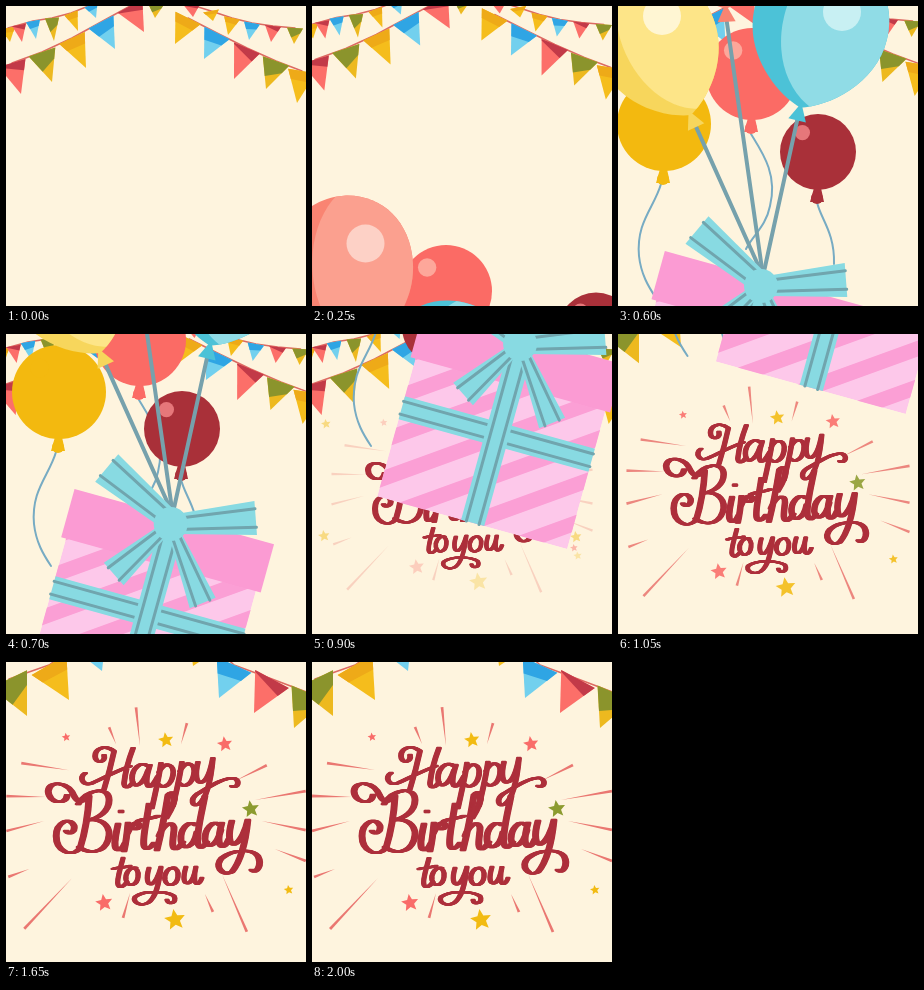
Write an HTML page with a canvas that moves like this. It is 300x300 px and loops after 2.3 s.

```html
<!DOCTYPE html>
<html lang="en">
<head>
<meta charset="utf-8">
<title>Happy Birthday to you</title>
<style>
html, body { margin: 0; width: 100%; height: 100%; overflow: hidden; background: #fef4de; }
canvas { display: block; width: 100vw; height: 100vh; }
</style>
</head>
<body>
<canvas id="stage" width="300" height="300" role="img" aria-label="Happy Birthday to you"></canvas>
<script>
const canvas = document.getElementById('stage');
const c = canvas.getContext('2d');
const LOOP = 2300, STEP = 50;
const ramp = (t, a, b) => Math.min(1, Math.max(0, (t - a) / (b - a)));
const smooth = p => p * p * (3 - 2 * p);

function poly(points, fill) {
  c.beginPath();
  points.forEach(([x, y]) => c.lineTo(x, y));
  c.closePath();
  c.fillStyle = fill;
  c.fill();
}
function disc(x, y, r, fill) {
  c.beginPath();
  c.arc(x, y, r, 0, 7);
  c.fillStyle = fill;
  c.fill();
}
function line(x1, y1, x2, y2, width, color) {
  c.beginPath();
  c.moveTo(x1, y1);
  c.lineTo(x2, y2);
  c.lineWidth = width;
  c.strokeStyle = color;
  c.stroke();
}

// ---- bunting: colour, middle of the top edge, tip ----
// cloth: shade, body, depth of the shade on the left side
const CLOTH = {
  r: ['#c23a48', '#fc6f69', .04], g: ['#8b942c', '#edb91f', .6],
  y: ['#eeaa18', '#f5bd1c', .3], b: ['#2fa5e4', '#72d0ee', .4]
};
const opening = [
  { half: 7, flags: [['y', 2, 22, 4, 36], ['r', 13, 19, 16, 36], ['b', 27, 15, 30, 33], ['g', 46, 12, 48, 35], ['y', 65, 7, 72, 25], ['b', 85, -1, 90, 12]] },
  { half: 8, flags: [['g', 150, -2, 149, 12], ['r', 186, -1, 187, 11], ['y', 205, 5, 207, 15], ['y', 226, 12, 222, 29], ['b', 246, 17, 243, 34], ['r', 267, 20, 265, 36], ['g', 289, 22, 288, 38]] },
  { half: 14, flags: [['r', 6, 57, 15, 88], ['g', 36, 46, 46, 76], ['y', 66, 32, 80, 62], ['b', 95, 16, 109, 43], ['r', 124, 0, 138, 26]] },
  { half: 14, flags: [['y', 182, 12, 169, 38], ['b', 211, 27, 198, 53], ['r', 241, 42, 228, 73], ['g', 270, 55, 260, 83], ['y', 296, 65, 291, 97]] }
];
const closing = [
  { half: 20, flags: [['g', 3, 17, 21, 54], ['y', 43, 3, 63, 38], ['b', 82, -24, 96, 9]] },
  { half: 19, flags: [['y', 200, -24, 187, 4], ['b', 228, 3, 213, 36], ['r', 266, 17, 248, 51], ['g', 303, 31, 288, 66]] }
];
function flag(half, [kind, x, y, tx, ty]) {
  const [dark, light, depth] = CLOTH[kind];
  const dx = tx - x, dy = ty - y, len = Math.hypot(dx, dy);
  const ux = dy / len * half, uy = -dx / len * half;
  const a = [x - ux, y - uy], b = [x + ux, y + uy], tip = [tx, ty];
  const mix = (p, k) => [p[0] + (tx - p[0]) * k, p[1] + (ty - p[1]) * k];
  poly([a, b, tip], light);
  poly([a, b, mix(b, .32), mix(a, depth)], dark);
}
function bunting(rows) {
  for (const { half, flags } of rows) {
    c.beginPath();
    flags.forEach(f => c.lineTo(f[1], f[2]));
    c.lineWidth = 1.5;
    c.strokeStyle = '#dd6a62';
    c.stroke();
    flags.forEach(f => flag(half, f));
  }
}
function drawBunting(t) {
  const drift = ramp(t, 0, 500), swap = smooth(ramp(t, 930, 1130));
  if (swap < 1) {
    c.save();
    c.translate(150, -7 * drift - 115 * swap);
    c.scale(1 + .04 * drift, 1);
    c.translate(-150, 0);
    bunting(opening);
    c.restore();
  }
  if (swap > 0) {
    c.save();
    c.translate(0, -70 * (1 - swap));
    bunting(closing);
    c.restore();
  }
}

// ---- greeting ----
const INK = '#ad2f3b';
const words = [
  [2.3, 3.6, 'M98 93C100 101 89 102 89 94C89 86 99 82 108 89C105 103 102 114 98 127' +
    'M79 111C72 115 77 125 86 121C97 116 108 110 124 104M127 86C122 99 119 112 118 121C118 127 123 126 127 120' +
    'M142 104C134 98 126 107 126 116C126 127 136 126 142 108M144 103C141 112 139 120 142 124C146 126 149 119 152 114' +
    'M155 101C153 116 149 132 146 146M153 110C159 98 169 102 167 113C165 124 157 127 152 122' +
    'M176 100C174 115 170 131 167 144M174 109C180 97 190 101 188 112C186 123 178 126 173 121' +
    'M192 100C189 112 190 122 196 120C202 118 205 107 207 96C205 118 201 136 193 142C186 146 184 137 191 132C203 125 218 115 228 116C235 118 232 127 226 124'],
  [2.4, 4.6, 'M61 133C60 144 42 141 42 129C43 118 62 119 68 134C72 142 78 140 83 134C82 152 79 170 74 186C66 196 50 190 50 174C50 160 64 154 68 164C69 171 62 173 60 169' +
    'M72 142C82 126 103 124 103 138C103 150 92 156 82 158C98 156 106 166 102 178C97 192 82 192 73 185' +
    'M112 162C110 172 107 182 110 187C113 190 117 186 119 181M115 149L115 150' +
    'M122 161C121 172 120 180 118 189M121 172C124 164 130 158 133 162C134 166 131 167 129 167' +
    'M143 142C141 158 136 176 138 184C140 189 145 186 148 181M132 159C139 156 145 157 152 154' +
    'M162 133C159 152 155 172 151 188M162 133C168 126 174 134 160 156M153 174C158 160 169 158 168 168C167 178 165 187 170 187C173 186 175 183 177 180' +
    'M190 163C182 157 174 168 175 178C176 190 188 186 191 170M199 134C196 150 190 172 192 182C194 188 198 185 201 180' +
    'M214 163C207 157 199 167 199 177C200 188 211 185 215 168M216 161C213 172 212 181 215 184C218 186 221 182 223 177' +
    'M226 159C222 173 223 184 229 182C235 179 240 168 242 158C240 178 236 198 226 210C216 215 208 204 216 196C226 188 246 186 252 194C257 203 250 213 246 208'],
  [2.2, 3.2, 'M117 196C114 208 110 219 112 223C114 227 118 224 121 220M107 207C112 205 118 206 124 204' +
    'M130 206C122 205 119 213 120 218C122 226 131 224 132 215C133 209 130 206 127 206' +
    'M143 206C140 216 141 224 146 222C151 219 153 212 155 205C153 222 150 236 142 241C134 245 126 240 129 235C138 228 160 229 168 234C172 241 162 244 161 238' +
    'M169 206C161 205 158 213 159 218C161 226 171 224 172 215C173 209 170 206 167 206' +
    'M180 205C177 215 177 223 183 221C187 219 189 211 190 205C188 213 188 221 191 222C194 222 195 219 196 216']
].map(([pen, spread, d]) => ({ pen, spread, path: new Path2D(d) }));

// inner end, outer end
const rays = [
  [63, 108, 15, 101], [40, 135, 0, 134], [38, 159, 0, 169], [23, 207, 2, 215],
  [66, 216, 18, 267], [110, 82, 103, 65], [134, 84, 130, 45], [175, 82, 181, 61],
  [229, 119, 261, 103], [249, 138, 300, 129], [256, 159, 300, 168], [269, 187, 300, 199],
  [216, 212, 241, 270], [199, 232, 207, 250], [124, 231, 117, 256]
];
const RED = '#f96c69', GOLD = '#f2bb12', GREEN = '#8c9b2f';
const stars = [
  [60, 75, 4.5, RED], [160, 78, 8, GOLD], [219, 82, 8, RED], [245, 147, 9, GREEN],
  [283, 228, 5, GOLD], [169, 258, 11, GOLD], [98, 241, 9, RED]
];
const sparks = [[14, 90, 5, GOLD], [12, 202, 6, GOLD], [264, 203, 6, GOLD], [262, 214, 4, RED]];

function star(x, y, r, fill) {
  const pts = [];
  for (let i = 0; i < 10; i++) {
    const a = i * Math.PI / 5 - 1.72, d = i % 2 ? r * .46 : r;
    pts.push([x + d * Math.cos(a), y + d * Math.sin(a)]);
  }
  poly(pts, fill);
}
function ray([x1, y1, x2, y2]) {
  const len = Math.hypot(x2 - x1, y2 - y1);
  const nx = (y1 - y2) / len * 1.4, ny = (x2 - x1) / len * 1.4;
  poly([[x1, y1], [x2 + nx, y2 + ny], [x2 - nx, y2 - ny]], '#ea7771');
}
function drawGreeting(t) {
  if (t < 750) return;
  const s = 1 - .13 * Math.exp((900 - t) / 180);
  c.save();
  c.globalAlpha = .45 * ramp(t, 800, 900) * (1 - ramp(t, 900, 1050));
  sparks.forEach(p => star(...p));
  c.translate(150, 180);
  c.scale(s, s);
  c.translate(-150, -180);
  c.globalAlpha = ramp(t, 830, 1080);
  rays.forEach(ray);
  stars.forEach(p => star(...p));
  c.globalAlpha = 1;
  c.strokeStyle = INK;
  for (const { pen, spread, path } of words) {
    c.lineWidth = pen;
    // a broad nib: the same stroke swept sideways
    for (let k = -.5; k <= .5; k += .125) {
      c.save();
      c.translate(k * spread, 0);
      c.stroke(path);
      c.restore();
    }
  }
  c.restore();
}

// ---- balloons ----
const round = [
  { x: 134, y: 68, vx: 0, vy: -.62, r: 46, fill: '#fb6b65', shine: '#fda79a', tail: 'M-1 60C10 78 26 100 18 132C14 152 2 160 -6 175' },
  { x: 46, y: 118, vx: .07, vy: -.6, r: 47, fill: '#f3b90f', shine: '#f3b90f', tail: 'M-3 60C-10 84 -28 98 -25 132C-23 150 -16 162 -8 174' },
  { x: 200, y: 146, vx: -.24, vy: -.51, r: 38, fill: '#a93039', shine: '#e6777a', tail: 'M-1 50C2 66 17 80 16 112' }
].map(b => ({ ...b, tail: new Path2D(b.tail) }));

function drawRound(b, t) {
  const dt = t - 600, r = b.r;
  c.save();
  c.translate(b.x + b.vx * dt, b.y + b.vy * dt);
  c.lineWidth = 2;
  c.strokeStyle = '#77abc3';
  c.stroke(b.tail);
  poly([[-4, r - 2], [3, r - 2], [6, r + 12], [-8, r + 12]], b.fill);
  disc(-1, r + 8, 6, b.fill);
  disc(0, 0, r, b.fill);
  disc(-r * .41, -r * .51, r * .2, b.shine);
  c.restore();
}

// placed relative to the knot of the bow
const large = [
  { x: -40, y: -358, rx: 65, ry: 79, tilt: -.06, dark: '#f98472', light: '#fba08f', shine: [17, -31], glint: '#fdd1c6' },
  { x: 58, y: -255, rx: 68, ry: 77, tilt: .24, dark: '#4cc2d7', light: '#90dce6', shine: [23, -19], glint: '#c8f0f3' },
  { x: -102, y: -240, rx: 61, ry: 74, tilt: -.43, dark: '#f7d65c', light: '#fde588', shine: [3, -30], glint: '#fff6d3' }
];
function drawLarge(b) {
  const { rx, ry } = b;
  c.save();
  c.translate(b.x, b.y);
  c.rotate(b.tilt);
  poly([[0, ry - 3], [9, ry + 15], [-9, ry + 15]], b.dark);
  c.beginPath();
  c.moveTo(0, ry + 2);
  c.bezierCurveTo(-rx * .4, ry * .92, -rx, ry * .5, -rx, -ry * .1);
  c.bezierCurveTo(-rx, -ry * .65, -rx * .55, -ry, 0, -ry);
  c.bezierCurveTo(rx * .55, -ry, rx, -ry * .65, rx, -ry * .1);
  c.bezierCurveTo(rx, ry * .5, rx * .4, ry * .92, 0, ry + 2);
  c.fillStyle = b.dark;
  c.fill();
  c.clip();
  c.beginPath();
  c.ellipse(rx * .45, -ry * .08, rx, ry * 1.12, 0, 0, 7);
  c.fillStyle = b.light;
  c.fill();
  c.restore();
  disc(b.x + b.shine[0], b.y + b.shine[1], 19, b.glint);
}

// ---- gift ----
const BAND = '#88dae2', EDGE = '#70a5ae';
function ribbon(x1, y1, x2, y2, w1, w2) {
  const len = Math.hypot(x2 - x1, y2 - y1);
  const nx = -(y2 - y1) / len, ny = (x2 - x1) / len;
  const at = (x, y, d) => [x + nx * d, y + ny * d];
  poly([at(x1, y1, -w1), at(x2, y2, -w2), at(x2, y2, w2), at(x1, y1, w1)], BAND);
  for (const k of [-.55, .55])
    line(...at(x1, y1, w1 * k), ...at(x2, y2, w2 * k), 3, EDGE);
}
function drawGift() {
  c.save();
  c.rotate(.27);
  c.save();
  c.beginPath();
  c.rect(-97, 30, 197, 155);
  c.clip();
  c.fillStyle = '#fdc8ea';
  c.fillRect(-97, 30, 197, 155);
  for (let y = -70; y < 330; y += 44)
    line(-110, y + 70, 115, y - 90, 15, '#fb9fd5');
  c.restore();
  c.fillStyle = '#fb9bd3';
  c.fillRect(-102, -8, 207, 50);
  ribbon(-97, 93, 100, 93, 12, 12);
  ribbon(2, 0, 2, 185, 12, 12);
  c.restore();
  ribbon(0, 0, -57, 50, 5, 15);
  ribbon(0, 0, 32, 79, 5, 14);
  ribbon(-4, -6, -64, -56, 11, 18);
  ribbon(6, 0, 85, -6, 10, 17);
  disc(0, 0, 17, BAND);
}

function drawBouquet(t) {
  const dt = t - 600, early = dt < 0;
  c.save();
  c.translate(143 + dt * (early ? .19 : .217), 280 + dt * (early ? -.99 : -.9));
  large.forEach(b => {
    const d = b.ry + 13;
    line(b.x - Math.sin(b.tilt) * d, b.y + Math.cos(b.tilt) * d, 2, -10, 4, '#76a1ac');
  });
  [large[2], large[0], large[1]].forEach(drawLarge);
  drawGift();
  c.restore();
}

function draw(t) {
  const k = canvas.width / 300;
  c.setTransform(k, 0, 0, k, 0, 0);
  c.fillStyle = '#fef4de';
  c.fillRect(0, 0, 300, 300);
  c.lineCap = c.lineJoin = 'round';
  drawBunting(t);
  drawGreeting(t);
  if (t < 1150) {
    round.forEach(b => drawRound(b, t));
    drawBouquet(t);
  }
}

const start = performance.now();
function tick(now) {
  const t = Math.max(0, now - start) % LOOP;
  draw(Math.floor(t / STEP) * STEP);
  requestAnimationFrame(tick);
}
draw(0);
requestAnimationFrame(tick);
</script>
</body>
</html>
```
